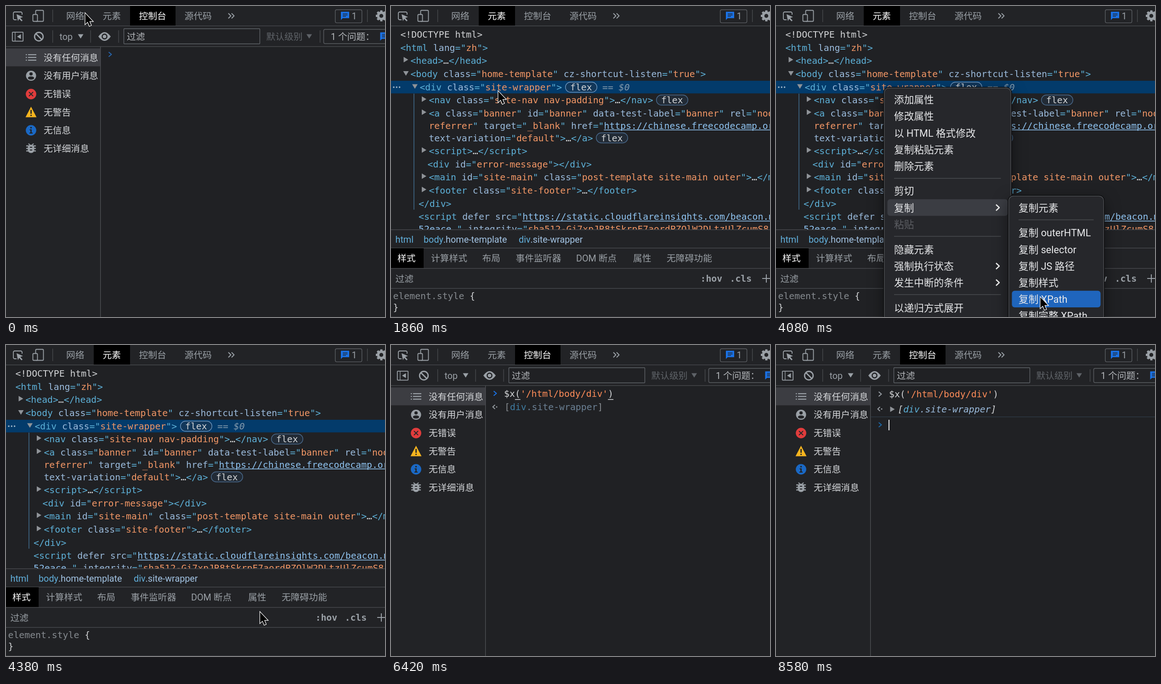
An HTML page with a canvas that plays this animation: 825 by 678 pixels, repeating every 8.64 s.

```html
<!DOCTYPE html>
<html lang="zh-CN">
<head>
<meta charset="utf-8">
<title>XPath</title>
<style>
html, body { margin: 0; width: 825px; height: 678px; overflow: hidden; background: #202124; }
canvas { display: block; }
</style>
</head>
<body>
<canvas id="stage" width="825" height="678"></canvas>
<script>
const W = 825, H = 678, LOOP = 8640, STEP = 60;
const c = document.getElementById('stage').getContext('2d');
const UI = 'Roboto, "Noto Sans CJK SC", "Noto Sans CJK", sans-serif';
const MONO = '"DejaVu Sans Mono", "Noto Sans Mono", monospace';
const BAR = '#222326', BG = '#202124', LINE = '#4a4c50', GREY = '#9aa0a6', LIGHT = '#d5d7da', BLUE = '#1a73e8';
const INK = { t: '#5db0d7', a: '#9bbbdc', v: '#f29766', l: '#8fc3f0', w: '#d2d4d6', g: '#8299ac', i: '#8299ac',
  s: '#fe8d59', d: '#858a8f', b: '#3f7ba0', c: '#6b8094' };

// moments of the story, in ms
const AT = { elements: 540, menu: 2160, sub: 3120, close: 4260, console: 5160, hide: 5400, typed: 5880, enter: 7500 };

const PATH = [[0, 172, 15], [420, 228, 20], [720, 228, 20], [1500, 233, 185], [1860, 233, 185], [2040, 234, 179],
  [2340, 234, 179], [2880, 405, 446], [3060, 405, 446], [3360, 540, 442], [3960, 575, 634], [4260, 575, 634],
  [4920, 318, 32], [5160, 318, 32], [5400, 300, 108]];

const TYPING = [[5400, '$'], [5460, '$x'], [5520, '$x()', 3], [5640, "$x('')", 4], [5760, "$x('/html/body/div')", 18],
  [AT.typed, "$x('/html/body/div')"]];

function pointer(t) {
  for (let i = 1; i < PATH.length; i++) {
    const [t0, x0, y0] = PATH[i - 1], [t1, x1, y1] = PATH[i];
    if (t <= t1) {
      const u = (t - t0) / (t1 - t0), e = u * u * (3 - 2 * u);
      return [x0 + (x1 - x0) * e, y0 + (y1 - y0) * e];
    }
  }
  return PATH[PATH.length - 1].slice(1);
}

function rect(x, y, w, h, color) { c.fillStyle = color; c.fillRect(x, y, w, h); }
function vline(x, y0, y1, color = LINE) { rect(x, y0, 1.3, y1 - y0, color); }
function hline(y, x0 = 0, x1 = W, color = LINE) { rect(x0, y, x1 - x0, 1.3, color); }

function round(x, y, w, h, r, fill, stroke, lw = 1.4) {
  c.beginPath();
  c.roundRect(x, y, w, h, r);
  if (fill) { c.fillStyle = fill; c.fill(); }
  if (stroke) { c.strokeStyle = stroke; c.lineWidth = lw; c.stroke(); }
}

function disc(x, y, r, color) {
  c.beginPath(); c.arc(x, y, r, 0, 7); c.fillStyle = color; c.fill();
}

function ring(x, y, r, color, lw) {
  c.beginPath(); c.arc(x, y, r, 0, 7); c.strokeStyle = color; c.lineWidth = lw; c.stroke();
}

function trace(pts) {
  c.beginPath();
  for (let i = 0; i < pts.length; i += 2) c.lineTo(pts[i], pts[i + 1]);
}
function poly(pts, color) { trace(pts); c.closePath(); c.fillStyle = color; c.fill(); }
function stroke(pts, color, lw) { trace(pts); c.strokeStyle = color; c.lineWidth = lw; c.stroke(); }

// y is the middle of the line of text
function text(s, x, y, color = LIGHT, size = 19.8, weight = 400) {
  c.font = `${weight} ${size}px ${UI}`;
  c.fillStyle = color;
  c.fillText(s, x, y + size * 0.37);
}

// runs parted by "|", each led by its colour key
function code(x, y, runs, style = '') {
  for (const run of runs.split('|')) {
    const key = run[0], s = run.slice(1);
    c.font = `${key === 'i' ? 'italic' : style} 19.8px ${MONO}`;
    c.fillStyle = INK[key];
    c.fillText(s, x, y + 7);
    const w = c.measureText(s).width;
    if (key === 'l') c.fillRect(x, y + 9, w, 1.5);
    x += w;
  }
  return x;
}

function twist(x, y, open) {
  poly(open ? [x - 6, y - 5, x + 6, y - 5, x, y + 5] : [x - 5, y - 6, x + 5, y, x - 5, y + 6], '#8f9398');
}

function chat(x, y) {
  poly([x, y, x + 18, y, x + 18, y + 14, x + 4, y + 14, x, y + 18], BLUE);
  hline(y + 3.7, x + 4, x + 14.5, BAR);
  hline(y + 6.6, x + 4, x + 14.5, BAR);
  hline(y + 9.4, x + 4, x + 11, BAR);
}

function gear(x, y) {
  ring(x, y, 7, GREY, 5.4);
  for (let i = 0; i < 8; i++) {
    const a = i * Math.PI / 4, dx = Math.cos(a), dy = Math.sin(a);
    stroke([x + dx * 8, y + dy * 8, x + dx * 12, y + dy * 12], GREY, 5);
  }
}

const TABS = [['网络', 131, 112, 191], ['元素', 210.5, 191, 270], ['控制台', 289.5, 270, 369], ['源代码', 388.5, 369, 468]];

function topBar(active, hover) {
  rect(0, 0, W, 43, BAR);
  c.lineJoin = 'round';
  stroke([23, 30, 18, 30, 16, 28, 16, 15, 18, 13, 33, 13, 35, 15, 35, 19], GREY, 1.8);
  poly([23, 18, 37, 24, 31, 26, 36, 31.5, 34, 33.5, 28.5, 28, 26, 33], GREY);
  round(64.5, 9.5, 17, 24, 2, null, GREY, 1.8);
  round(58.5, 18.5, 10, 15, 2, BAR, GREY, 1.8);
  vline(101, 8, 35);
  TABS.forEach(([name, x, x0, x1], i) => {
    const on = i === active, hot = i === hover;
    if (on || hot) rect(x0, 0, x1 - x0, 43, on ? '#000' : '#303137');
    text(name, x, 22, on || hot ? '#fff' : GREY, 19.8, on ? 500 : 400);
  });
  for (const x of [484, 491]) stroke([x, 16, x + 5.5, 21.5, x, 27], GREY, 1.9);
  round(716.7, 8.2, 58, 28.4, 3, null, '#5a5d61');
  chat(729, 12.5);
  text('1', 752.5, 22, GREY);
  vline(786, 8, 35);
  gear(817, 21.5);
  hline(42.8);
}

function consoleBar() {
  rect(0, 44, W, 44, BAR);
  round(13.8, 57.2, 23.4, 19.4, 1, null, GREY, 1.8);
  vline(19.2, 57, 77, GREY);
  poly([32.5, 61.5, 32.5, 72, 24, 66.8], GREY);
  ring(71.5, 66.8, 9.3, GREY, 2.8);
  stroke([65, 60.2, 78, 73.2], GREY, 2.8);
  for (const x of [101, 183.5, 244.5, 683]) vline(x, 53, 80);
  text('top', 116.5, 67, GREY);
  poly([156.5, 61.5, 168.5, 61.5, 162.5, 71], GREY);
  c.beginPath();
  c.moveTo(201, 66.5); c.quadraticCurveTo(214.5, 47.5, 228, 66.5); c.quadraticCurveTo(214.5, 85.5, 201, 66.5);
  c.fillStyle = GREY; c.fill();
  disc(214.5, 66.5, 6.4, BAR);
  disc(214.5, 66.5, 3.8, GREY);
  round(256.5, 49.5, 296, 33, 1, BG, '#5f6368');
  text('过滤', 263, 67, '#b4b7bb');
  text('默认级别', 566.5, 67, '#5f6368');
  poly([654, 61.5, 666, 61.5, 660, 71], '#5f6368');
  round(691.5, 51, 150, 31, 3, null, '#5a5d61');
  text('1 个问题：', 707, 67, '#b4b7bb');
  chat(814.5, 57.5);
  hline(87.8);
}

function sidebar() {
  rect(0, 89, 205, H, BAR);
  rect(0, 92.5, 205, 39, '#3c3d42');
  vline(205, 89, H, '#505256');
  ['没有任何消息', '没有用户消息', '无错误', '无警告', '无信息', '无详细消息']
    .forEach((s, i) => text(s, 82, 112.5 + i * 39.6));
  const x = 54.5;
  for (const y of [106, 112, 118]) {
    rect(43, y - 1, 2.5, 2.2, GREY);
    rect(48, y - 1, 18, 2.2, GREY);
  }
  disc(x, 152, 11, GREY);
  disc(x, 148, 3.6, BAR);
  c.beginPath(); c.ellipse(x, 157, 6.8, 3.4, 0, 0, 7); c.fill();
  disc(x, 192, 11.4, '#e03c3c');
  stroke([50, 187.5, 59, 196.5], '#26272a', 2);
  stroke([59, 187.5, 50, 196.5], '#26272a', 2);
  poly([x, 219.5, 66.5, 242.5, 42.5, 242.5], '#f5b41f');
  rect(53.2, 226.5, 2.8, 8.5, '#26272a');
  rect(53.2, 237, 2.8, 2.8, '#26272a');
  disc(x, 271, 11.4, '#1a68c4');
  disc(x, 265.2, 1.8, '#222');
  rect(51.5, 269, 4.2, 2, '#222');
  rect(53.2, 269, 2.6, 8, '#222');
  rect(51, 276, 7, 2, '#222');
  for (const y of [305, 310.5, 316]) rect(44, y - 1.2, 21, 2.4, GREY);
  stroke([49, 300, 53, 304], GREY, 2.2);
  stroke([60, 300, 56, 304], GREY, 2.2);
  round(47.5, 302.5, 14, 18, 6.5, GREY);
  rect(52, 307, 5, 2, BAR);
  rect(52, 313, 5, 2, BAR);
}

function prompt(y, color) { stroke([223.5, y - 5, 229.5, y, 223.5, y + 5], color, 2); }
function answer(y) {
  stroke([226.5, y - 4.5, 221.5, y, 226.5, y + 4.5], GREY, 1.8);
  disc(230, y, 1.5, GREY);
}

function consolePage(t) {
  consoleBar();
  sidebar();
  const call = "w$x(|s'/html/body/div'|w)";
  if (t >= AT.enter) {
    prompt(107, GREY);
    code(246, 107, call);
    answer(139.5);
    twist(253.5, 140, false);
    code(265, 140, 'w[|tdiv|a.site-wrapper|w]', 'italic');
    hline(156, 206, W, '#2e3a46');
    prompt(174, '#1d69a8');
    if ((t - AT.enter) % 1000 < 500) rect(245, 163, 1.8, 23, '#fff');
    return;
  }
  const last = TYPING.filter(k => t >= k[0]).pop();
  prompt(105.5, last ? BLUE : '#2767b0');
  if (!last) return;
  const [from, s, at = s.length] = last;
  const parts = s.match(/^([^']*)('.*')?(.*)$/);
  code(246, 106, `w${parts[1]}|s${parts[2] || ''}|w${parts[3]}`);
  const cw = c.measureText('0').width;
  if (t >= AT.typed) {
    for (const i of [2, 19]) rect(246 + i * cw, 118, cw, 1.5, LIGHT);
    answer(135);
    code(247, 135, 'd[|bdiv|c.site-wrapper|d]');
  }
  if ((t - from) % 1000 < 500) rect(246 + at * cw, 95, 1.8, 23, '#fff');
}

function pill(x, y, on) {
  round(x + 0.7, y - 11, 68.6, 22, 11, on ? '#12375a' : '#222b36', on ? '#6b93bb' : '#4a6a8c');
  code(x + 11, y, 'wflex');
}

function tree() {
  c.save();
  c.beginPath(); c.rect(0, 44, W, 443); c.clip();
  rect(0, 163, W, 27.5, '#033b6b');
  for (const x of [6, 12.3, 18.6]) disc(x, 177, 1.8, '#9fb5c8');
  vline(49.3, 191, 444, '#47799f');
  code(20.4, 62, 'w<!DOCTYPE html>');
  code(20.4, 91, 't<html |alang|t="|vzh|t">');
  twist(32.5, 117, false);
  code(42.4, 119, 't<head>|w…|t</head>');
  twist(32.5, 147, true);
  code(42.4, 148, 't<body |aclass|t="|vhome-template|t" |acz-shortcut-listen|t="|vtrue|t">');
  twist(52, 175.5, true);
  code(62.4, 177, 't<div |aclass|t="|vsite-wrapper|t">');
  pill(379, 177, true);
  code(460, 177, 'g== |i$0');
  for (const y of [203, 231.5, 314, 371, 400]) twist(72, y, false);
  const x = 82.4;
  code(x, 205, 't<nav |aclass|t="|vsite-nav nav-padding|t">|w…|t</nav>');
  pill(577, 205);
  code(x, 234, 't<a |aclass|t="|vbanner|t" |aid|t="|vbanner|t" |adata-test-label|t="|vbanner|t" |arel|t="|vnoopener');
  code(x, 260.5, 'vreferrer|t" |atarget|t="|v_blank|t" |ahref|t="|lhttps://chinese.freecodecamp.org');
  code(x, 287.5, 'atext-variation|t="|vdefault|t">|w…|t</a>');
  pill(446, 287.5);
  code(x, 316, 't<script>|w…|t<\/script>');
  code(79.6, 344.5, 't<div |aid|t="|verror-message|t"></div>');
  code(x, 373, 't<main |aid|t="|vsite-main|t" |aclass|t="|vpost-template site-main outer|t">|w…|t</main>');
  code(x, 402, 't<footer |aclass|t="|vsite-footer|t">|w…|t</footer>');
  code(60, 430.5, 't</div>');
  code(60, 459, 't<script |adefer src|t="|lhttps://static.cloudflareinsights.com/beacon.min.js');
  code(60, 485.5, 'l52eace…|t" |aintegrity|t="|vsha512-Gi7xpJR8tSkrpF7aordPZQlW2DLtzUlZcumS8');
  c.restore();
}

function crumb(x, tag, rest = '') {
  text(tag, x, 508.5, '#62b0dc');
  const w = c.measureText(tag).width;
  text(rest, x + w, 508.5, '#a3c4e4');
}

function elementsPage() {
  tree();
  rect(0, 487, W, 128, BAR);
  hline(487);
  crumb(9.5, 'html');
  crumb(71, 'body', '.home-template');
  crumb(278, 'div', '.site-wrapper');
  hline(527);
  rect(0, 528, 71, 43.5, '#000');
  text('样式', 14, 550, '#fff', 19.8, 500);
  [['计算样式', 87], ['布局', 198.5], ['事件监听器', 271.5], ['DOM 断点', 403], ['属性', 527], ['无障碍功能', 600]]
    .forEach(([s, x]) => text(s, x, 550, GREY));
  hline(571.5);
  text('过滤', 9.5, 594.5, GREY);
  c.font = `bold 19.8px ${MONO}`;
  c.fillStyle = GREY;
  c.fillText(':hov', 673.5, 601);
  c.fillText('.cls', 737.5, 601);
  rect(808, 593, 18, 2, GREY);
  rect(816, 585, 2, 18, GREY);
  hline(615);
  code(4.5, 631.5, 'delement.style|w {');
  code(4.5, 657, 'w}');
  hline(677, 0, W, '#3a3c40');
}

const MAIN = [['添加属性', 204], ['修改属性', 240], ['以 HTML 格式修改', 276.5], ['复制粘贴元素', 313], ['删除元素', 349],
  ['剪切', 403], ['复制', 439.5, 'more'], ['粘贴', 476, 'off'], ['隐藏元素', 530.5], ['强制执行状态', 567, 'more'],
  ['发生中断的条件', 603, 'more'], ['以递归方式展开', 657.5]];
const SUB = [['复制元素', 440], ['复制 outerHTML', 494], ['复制 selector', 530.5], ['复制 JS 路径', 567], ['复制样式', 603],
  ['复制 XPath', 639], ['复制完整 XPath', 675]];

function menu(x, y, w, items, seps, hot, held) {
  c.save();
  c.shadowColor = 'rgba(0,0,0,.5)';
  c.shadowBlur = 32;
  c.shadowOffsetY = 10;
  round(x, y, w, 700, 11, '#26272b');
  c.restore();
  round(x, y, w, 700, 11, null, '#0c0d0f', 3);
  round(x + 0.8, y + 0.8, w - 1.6, 700, 10, '#26272b', '#55575b', 1.2);
  for (const s of seps) hline(s, x + 22, x + w - 22.5, '#4e5054');
  for (const [s, cy, kind] of items) {
    const lit = hot && kind !== 'off' && Math.abs(hot[1] - cy) < 18.2;
    if (lit || (held && s === '复制')) round(x + 7.5, cy - 18.3, w - 15, 36.4, 6, lit ? '#1f65bd' : '#3b3d43');
    text(s, x + 22, cy, kind === 'off' ? '#5c5e63' : '#e8e9eb', 21.65);
    if (kind === 'more') stroke([x + 244, cy - 6.5, x + 251, cy, x + 244, cy + 6.5], '#f0f0f0', 2.5);
  }
}

function menus(t, p) {
  if (t < AT.menu || t >= AT.close) return;
  const sub = t >= AT.sub;
  const inSub = sub && p[0] > 506;
  menu(235, 178, 277, MAIN, [375, 501.5, 628.5], inSub || p[0] < 236 ? null : p, inSub);
  if (sub) menu(506, 413.5, 208, SUB, [465.5], inSub ? p : null);
}

function arrow(x, y) {
  c.save();
  c.translate(x, y);
  c.lineJoin = 'miter';
  const pts = [0.5, 1, 0.5, 24.5, 5.8, 19.6, 9.6, 28.6, 13.2, 27, 9.5, 18.2, 16.8, 18.2];
  trace(pts);
  c.closePath();
  c.strokeStyle = '#fff';
  c.lineWidth = 2.4;
  c.stroke();
  poly(pts, '#000');
  c.restore();
}

function draw(t) {
  const p = pointer(t);
  const inspect = t >= AT.elements && t < AT.console;
  const shown = t < AT.hide;
  const hover = shown && t > 0 && p[1] < 43 ? TABS.findIndex(b => p[0] >= b[2] && p[0] < b[3]) : -1;
  rect(0, 0, W, H, BG);
  topBar(inspect ? 1 : 2, hover);
  if (inspect) elementsPage(); else consolePage(t);
  menus(t, p);
  if (shown) arrow(...p);
}

function frame() {
  const t = performance.now() % LOOP;
  draw(t - t % STEP);
  requestAnimationFrame(frame);
}
frame();
</script>
</body>
</html>
```
